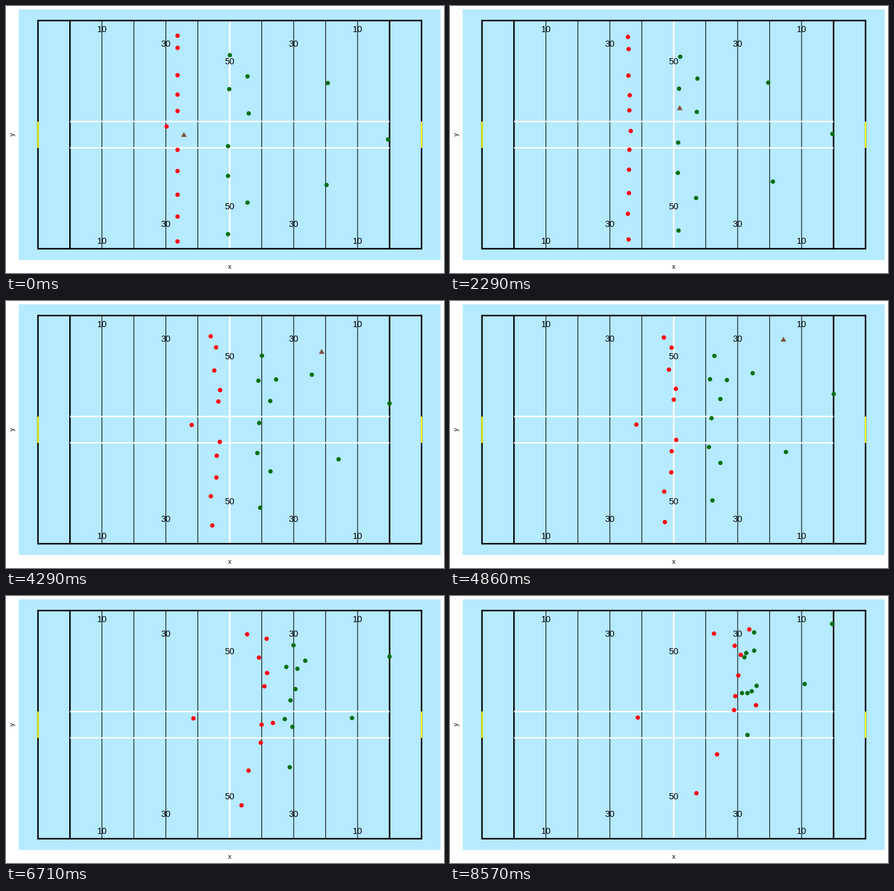
Animation, 720 px wide and 440 px high, one loop 8.71 s. Source, as a matplotlib script:

```python
import numpy as np
import matplotlib.pyplot as plt
from matplotlib.animation import FuncAnimation
from matplotlib.patches import Circle, Rectangle, RegularPolygon

W, H, DPI = 720, 440, 80
FRAMES, LOOP_MS = 61, 8710
PT = 72 / DPI  # points per pixel

SKY, RED, GREEN, BROWN = "#b5eaff", "#ff0010", "#0a6f14", "#80533f"
LEFT, YARD = 52.6, 5.254
TOP, BOTTOM = 24, 400
HASH_TOP, HASH_BOTTOM = 190.4, 233.8

# Frames of the first step, mid-run and end; and of the kick and ball exit.
START, MID, END = 7, 39, 60
KICK, BALL_OUT = 10, 43

fig = plt.figure(figsize=(W / DPI, H / DPI), dpi=DPI, facecolor="white")
ax = fig.add_axes([0, 0, 1, 1])
ax.set_xlim(0, W)
ax.set_ylim(H, 0)
ax.axis("off")


def yard_x(yards):
    return LEFT + YARD * yards


def line(x0, y0, x1, y1, color, width):
    ax.plot([x0, x1], [y0, y1], color=color, lw=width * PT,
            solid_capstyle="butt", snap=False, zorder=2)


def label(x, y, text, size, **kw):
    ax.text(x, y, text, fontsize=size * PT, family="Liberation Sans",
            ha="center", color="black", zorder=6, **kw)


def draw_field():
    ax.add_patch(Rectangle((21, 5.5), 693.5, 413, color=SKY, lw=0, snap=False, zorder=1))
    for yards in range(20, 110, 10):
        if yards != 60:
            line(yard_x(yards), TOP, yard_x(yards), BOTTOM, "black", 1.1)
    line(yard_x(60), TOP, yard_x(60), BOTTOM, "white", 2.6)
    for yards in (0, 10, 110, 120):
        line(yard_x(yards), TOP - 1.2, yard_x(yards), BOTTOM + 1.2, "black", 2.4)
    for y in (TOP, BOTTOM):
        line(yard_x(0), y, yard_x(120), y, "black", 2.4)
    for y in (HASH_TOP, HASH_BOTTOM):
        line(yard_x(10), y, yard_x(110), y, "white", 2.3)
    for yards in (0, 120):
        line(yard_x(yards), HASH_TOP, yard_x(yards), HASH_BOTTOM, "yellow", 2.3)

    for number, upper, lower in ((10, 43.4, 392.4), (30, 67.4, 363.6), (50, 96.5, 335.3)):
        for yards in {number + 10, 110 - number}:
            for y in (upper, lower):
                label(yard_x(yards), y, str(number), 14.6, va="baseline")
    label(367.7, 433, "x", 11, va="baseline")
    label(10.6, 211, "y", 11, va="center", rotation=90)


def hermite(s, span, p0, p1, m0, m1):
    return (p0 + s * s * (3 - 2 * s) * (p1 - p0)
            + span * s * (1 - s) * ((1 - s) * m0 - s * m1))


def run_path(start, mid, end):
    """Smooth run that leaves start from rest and passes mid on the way to end."""
    start, mid, end = (np.array(p, float) for p in (start, mid, end))
    h0, h1 = MID - START, END - MID
    d0, d1 = (mid - start) / h0, (end - mid) / h1
    v_mid = (3 * h1 * d0 + 1.5 * h0 * d1) / (1.5 * h0 + 2 * h1)
    v_end = 1.5 * d1 - 0.5 * v_mid

    def at(t):
        if t < MID:
            return hermite(max(t - START, 0) / h0, h0, start, mid, 0, v_mid)
        return hermite((t - MID) / h1, h1, mid, end, v_mid, v_end)

    return at


def kicker_path(t):
    """Jog up to the ball, then slow to a stop."""
    return 264 + 45 * (1 - np.exp(-t / 12)), 198.6 + 1.25 * t * np.exp(-t / 16)


def ball_path(t):
    """Flight slowed by drag."""
    u = max(t - KICK, 0)
    return 292.4 + 450 * (1 - np.exp(-0.035 * u)), 213 - 390 * (1 - np.exp(-0.02 * u))


players = []


def add_player(color, path):
    dot = ax.add_patch(Circle((0, 0), 3.6, color=color, lw=0, zorder=4))
    players.append((dot, path))


def cover(y, mid, end):
    add_player(RED, run_path((282, y), mid, end))


def block(start, mid, end):
    add_player(GREEN, run_path(start, mid, end))


draw_field()

cover(49, (370, 62), (434, 62))
cover(69, (389, 76), (492, 55))
cover(114, (382, 110), (468, 82))
cover(146, (395, 140), (478, 97))
cover(173, (391, 158), (474, 131))
add_player(RED, kicker_path)
cover(237, (398, 223), (503, 180))
cover(272, (387, 236), (469, 165))
cover(311, (386, 269), (467, 188))
cover(347, (371, 304), (439, 261))
cover(388, (369, 357), (405, 325))

block((368, 81), (451, 89), (500, 60))
block((397, 116), (467, 129), (487, 94))
block((367, 137), (442, 125), (484, 101))
block((399, 177), (457, 158), (504, 148))
block((365, 231), (446, 184), (496, 157))
block((365, 280), (440, 227), (480, 160))
block((365, 376), (447, 312), (489, 229))
block((397, 324), (456, 248), (489, 160))
block((529, 127), (493, 115), (500, 90))
block((527, 295), (559, 232), (583, 145))
block((628, 220), (631, 133), (628, 46))

ball = ax.add_patch(RegularPolygon((0, 0), 3, radius=5.4, orientation=np.pi,
                                   color=BROWN, lw=0, zorder=5))


def update(frame):
    for dot, path in players:
        dot.center = tuple(path(frame))
    ball.xy = ball_path(frame)
    ball.set_visible(frame <= BALL_OUT)
    return [dot for dot, _ in players] + [ball]


anim = FuncAnimation(fig, update, frames=FRAMES, interval=LOOP_MS / FRAMES,
                     repeat=True, repeat_delay=0, blit=False)
plt.show()
```
